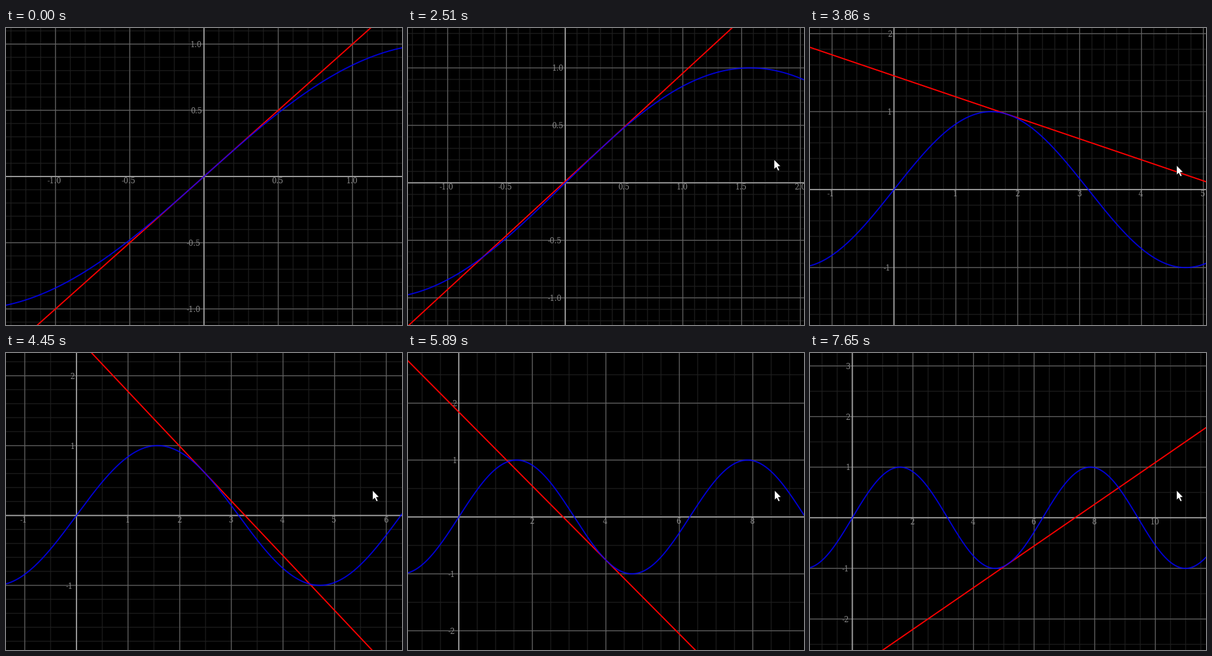
Recreate the animation shown at these times as a matplotlib script. Size 640 by 480 pixels, loop 7.75 s.

```python
import numpy as np
import matplotlib.pyplot as plt
from matplotlib.animation import FuncAnimation
from matplotlib.patches import Polygon

WIDTH, HEIGHT, DPI = 640, 480, 80
PX = 72 / DPI
LOOP, INTERVAL = 7750, 25

fig = plt.figure(figsize=(WIDTH / DPI, HEIGHT / DPI), dpi=DPI, facecolor="black")
ax = fig.add_axes([0, 0, 1, 1])
ax.set_xlim(0, WIDTH)
ax.set_ylim(HEIGHT, 0)
ax.axis("off")


def stroke(color, width, z, **kw):
    return ax.plot([], [], color=color, lw=width * PX, zorder=z, snap=False, **kw)[0]


minor = stroke("#1a1a1a", 1.5, 1)
major = stroke("#5c5c5c", 1.4, 2)
axes_lines = stroke("#a4a4a4", 1.8, 3)
tangent = stroke("#ff0000", 2, 5)
curve = stroke((0, 0, 1, 0.83), 2, 6)
labels = [ax.text(0, 0, "", color="#8c8c8c", family="DejaVu Serif",
                  size=12 * PX, va="baseline", zorder=4) for _ in range(40)]

ARROW = np.array([(0, 0), (0, 15.5), (3.4, 12.4), (6.2, 18), (8.6, 17),
                  (6, 11.2), (10.6, 10.8)])
cursor = Polygon(ARROW, fc="white", ec="black", lw=0.6 * PX, zorder=9)
ax.add_patch(cursor)

# Times at which the view is redrawn
STEPS = np.concatenate([
    [1720, 1820, 1970], np.linspace(2090, 2730, 10), [2820, 2970, 3050],
    np.linspace(3150, 3740, 6), [3860], np.linspace(3980, 4570, 6), [4690],
    [4840, 4960, 5070, 5190, 5310, 5450, 5890, 6060, 6240, 6380, 6520],
    [6670, 6840, 6980, 7130, 7300, 7470, 7650]])
# Tangent point (also the centre of the view) by number of redraws
KEY_STEP = np.array([0, 3, 16, 23, 33, 42, 48])
KEY_POINT = np.array([0, 0.167, 0.543, 1.8435, 3.11, 4.932, 5.137])
ORIGIN_Y = [240, 246, 255, 261.2, 264, 266, 266.3]

# Pointer stops: time, x, y
POINTER = np.array([(140, 628, 123), (350, 567, 222), (640, 568, 217),
                    (900, 582, 191), (1070, 590.5, 196), (1970, 590.5, 196),
                    (2820, 592.5, 222), (LOOP, 592.5, 222)])
POINTER_TICKS = np.concatenate([np.linspace(140, 350, 6),
                                np.linspace(640, 1070, 11), STEPS])


def smooth_keys(x, xs, ys):
    """Monotone cubic interpolation."""
    h = np.diff(xs)
    d = np.diff(ys) / h
    m = np.concatenate([[d[0]], 2 * d[:-1] * d[1:] / (d[:-1] + d[1:]), [d[-1]]])
    i = min(np.searchsorted(xs, x, side="right") - 1, len(h) - 1)
    s = (x - xs[i]) / h[i]
    return ((1 + 2 * s) * (1 - s) ** 2 * ys[i] + s * (1 - s) ** 2 * h[i] * m[i]
            + s * s * (3 - 2 * s) * ys[i + 1] + s * s * (s - 1) * h[i] * m[i + 1])


def nice_step(scale, min_px):
    """Smallest 1-2-5 step that spans at least min_px pixels."""
    return next(b * 10.0 ** e for e in range(-2, 3) for b in (1, 2, 5)
                if b * 10.0 ** e * scale >= min_px)


def ticks(lo, hi, step):
    return np.arange(np.ceil(lo / step), np.floor(hi / step) + 1) * step


def set_grid(line, xs, ys):
    path = [p for x in xs for p in ((x, 0), (x, HEIGHT), (np.nan, np.nan))]
    path += [p for y in ys for p in ((0, y), (WIDTH, y), (np.nan, np.nan))]
    line.set_data(*np.array(path).T)


def draw_view(point):
    half = 4 / 3 + 1.0125 * point
    sx = WIDTH / 2 / half
    sy = 214 / (half / (4 / 3)) ** 0.605
    x0 = WIDTH / 2 - point * sx
    y0 = np.interp(point, KEY_POINT, ORIGIN_Y)
    left, right = -x0 / sx, (WIDTH - x0) / sx
    bottom, top = (y0 - HEIGHT) / sy, y0 / sy

    def to_x(v):
        return x0 + v * sx

    def to_y(v):
        return y0 - v * sy

    for line, gap in ((minor, 18.5), (major, 75)):
        step_x, step_y = nice_step(sx, gap), nice_step(sy, gap)
        xs, ys = ticks(left, right, step_x), ticks(bottom, top, step_y)
        set_grid(line, to_x(xs), to_y(ys))
    set_grid(axes_lines, [x0], [y0])

    xv = np.linspace(left, right, 321)
    curve.set_data(to_x(xv), to_y(np.sin(xv)))
    ends = np.array([left, right])
    tangent.set_data(to_x(ends),
                     to_y(np.sin(point) + np.cos(point) * (ends - point)))

    def caption(v, step):
        return f"{v:.{1 if step < 0.99 else 0}f}"

    items = [(to_x(v) - (1 if v > 0 else 2.4), y0 + 11, caption(v, step_x), "center")
             for v in xs if abs(v) > 1e-6]
    items += [(x0 - (3.2 if v > 0 else 5.6), to_y(v) + 5, caption(v, step_y), "right")
              for v in ys if abs(v) > 1e-6]
    for text in labels:
        text.set_visible(False)
    for text, (x, y, string, align) in zip(labels, items):
        text.set(position=(x, y), text=string, ha=align, visible=True)


def update(frame):
    now = frame * INTERVAL + 20
    count = np.searchsorted(STEPS, now, side="right")
    draw_view(smooth_keys(count, KEY_STEP, KEY_POINT))

    tick = np.searchsorted(POINTER_TICKS, now, side="right")
    cursor.set_visible(tick > 0)
    if tick:
        when = POINTER_TICKS[tick - 1]
        tip = [np.interp(when, POINTER[:, 0], POINTER[:, k]) for k in (1, 2)]
        cursor.set_xy(ARROW + tip)
    return []


animation = FuncAnimation(fig, update, frames=LOOP // INTERVAL, interval=INTERVAL,
                          init_func=lambda: [], repeat=True, repeat_delay=0)
plt.show()
```
